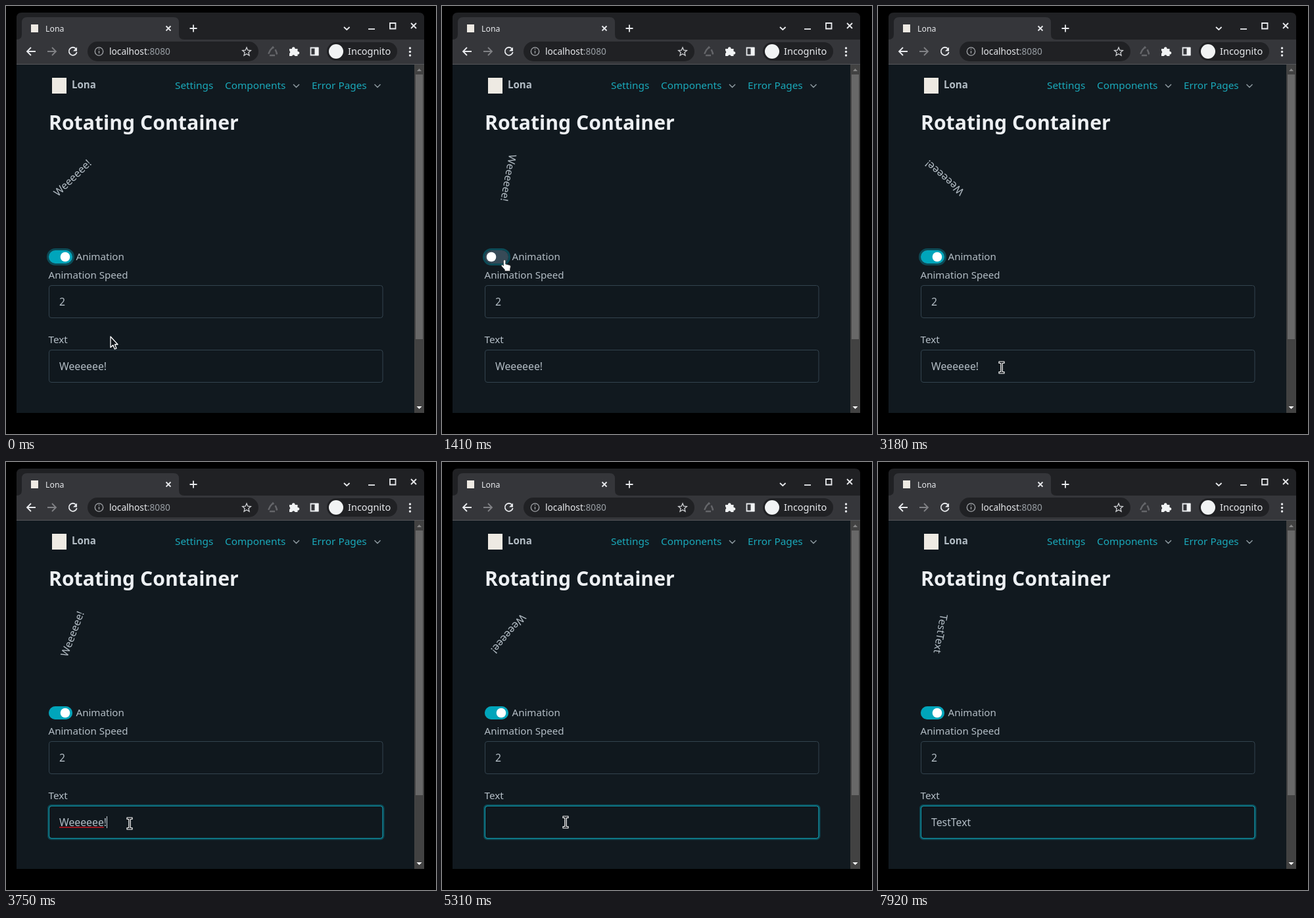
An HTML page for the animation above (8000 ms loop, 654x650 px).

```html
<!DOCTYPE html>
<html lang="en">
<head>
<meta charset="utf-8">
<title>Rotating Container</title>
<style>
  html, body { margin: 0; width: 100%; height: 100%; overflow: hidden; background: #000; }
  svg { display: block; width: 654px; height: 650px; }
  text { font-family: "Noto Sans", "Open Sans", sans-serif; font-size: 15.3px; fill: #b3bdc5; white-space: pre; }
  .input { font-size: 15.8px; }
  .link { fill: #1aa9ba; }
  .chrome { fill: #e8eaed; }
  .line { fill: none; stroke: #e8eaed; stroke-width: 1.8; }
  .field { fill: #10181e; stroke: #33434e; }
  .cursor { stroke: #fff; stroke-width: 1.3; stroke-linejoin: round; }
</style>
</head>
<body>
<svg viewBox="0 0 654 650">
  <!-- window frame and tab strip -->
  <path d="M16 89V18q0-8 8-8H628q8 0 8 8V89z" fill="#202124"/>
  <path d="M16 51q8 0 8-8V25q0-8 8-8H255q8 0 8 8V43q0 8 8 8H636V89H16z" fill="#35363a"/>
  <rect x="16" y="88" width="620" height="1" fill="#56575b"/>
  <rect x="38" y="28" width="11" height="12" fill="#eeeae3"/>
  <text class="chrome" x="60" y="39" style="font-size:12.3px">Lona</text>
  <g class="line">
    <path d="M243.5 30.5l7 7m0-7l-7 7"/>
    <path d="M285 28.5v11m-5.500-5.500h11"/>
    <path d="M514 32l4.300 4 4.300-4"/>
    <path d="M551 35h10"/>
    <path d="M584 26h8.500v8.500h-8.500z"/>
    <path d="M616 26l8 8m0-8l-8 8"/>
  </g>

  <!-- toolbar -->
  <rect x="124" y="54" width="260" height="30" rx="15" fill="#202124"/>
  <rect x="488" y="55" width="107" height="28" rx="14" fill="#202124"/>
  <path id="arrow" class="line" d="M45 69H32m6-6l-6 6 6 6"/>
  <path class="line" style="stroke:#808185" d="M63 69h13m-6-6l6 6-6 6"/>
  <path class="line" d="M106.500 65a6 6 0 1 0 1.200 5"/>
  <path d="M108 62.500v6h-6z" fill="#e8eaed"/>
  <g class="line" style="stroke:#a3a6aa;stroke-width:1.3">
    <circle cx="141.500" cy="69" r="6.200"/>
    <path d="M141.500 68v4m0-7.200v1.500"/>
  </g>
  <text x="157" y="74" style="font-size:13.7px;fill:#9aa0a6"><tspan fill="#e8eaed">localhost</tspan>:8080</text>
  <path class="line" style="stroke:#d0d2d5;stroke-width:1.3" d="M366 63l1.800 4.200 4.600.4-3.500 3 1.100 4.500-4-2.400-4 2.400 1.100-4.500-3.500-3 4.600-.4z"/>
  <path class="line" style="stroke:#65666a;stroke-width:2.4;stroke-dasharray:8 3" d="M402 67l4-4.500 4 4.500 2 5-2 3h-8l-3-2z"/>
  <path d="M431 65h4a2.300 2.300 0 1 1 4.500 0h4v4a2.300 2.300 0 1 1 0 4.500v2.500h-4a2.300 2.300 0 0 0-4.500 0h-4v-4a2.300 2.300 0 0 0 0-4z" fill="#f1f3f4"/>
  <path class="line" d="M463.500 63.500h11v11h-11z"/>
  <path d="M469.500 63h6v12h-6z" fill="#f1f3f4"/>
  <circle cx="502" cy="69" r="11" fill="#f1f3f4"/>
  <text class="chrome" x="520" y="74" style="font-size:14.5px">Incognito</text>
  <g fill="#e8eaed"><circle cx="614.500" cy="64" r="1.700"/><circle cx="614.500" cy="69.500" r="1.700"/><circle cx="614.500" cy="75" r="1.700"/></g>

  <!-- page -->
  <rect x="16" y="89" width="605" height="529" fill="#11191f"/>
  <rect x="621" y="89" width="15" height="529" fill="#424242"/>
  <rect x="623" y="104" width="11" height="402" fill="#686868"/>
  <path d="M625 99l3.500-4 3.500 4z" fill="#868686"/>
  <path d="M624.500 608l4 4 4-4z" fill="#fff"/>

  <rect x="70" y="109" width="22" height="24" fill="#eeeae3"/>
  <text x="100" y="125" style="font-size:15.1px;font-weight:700">Lona</text>
  <text class="link" x="257" y="126">Settings</text>
  <text class="link" x="333" y="126">Components</text>
  <text class="link" x="465" y="126">Error Pages</text>
  <path class="line" style="stroke:#8c989f;stroke-width:1.5" d="M437 119l4.500 4.500 4.500-4.500m114.500 0l4.500 4.500 4.500-4.500"/>
  <text x="65" y="188" style="font-size:30.2px;font-weight:700;fill:#edf0f3">Rotating Container</text>

  <text id="spinner" class="input"></text>

  <rect id="switchGlow" x="63.500" y="369.500" width="39" height="23" rx="11.500" fill="none" stroke="#0c4a56" stroke-width="3"/>
  <rect x="65" y="371" width="36" height="20" rx="10" fill="#374956"/>
  <rect id="switchOn" x="65" y="371" width="36" height="20" rx="10" fill="#00a5bb"/>
  <circle id="knob" cy="381" r="7.300" fill="#fff"/>
  <text x="106.500" y="386" style="font-size:15.1px">Animation</text>
  <text x="64.500" y="414" style="font-size:15.1px">Animation Speed</text>
  <rect class="field" x="65.500" y="424.500" width="507.500" height="49" rx="3.500"/>
  <text class="input" x="81" y="455">2</text>
  <text x="64.500" y="512">Text</text>
  <rect class="field" x="65.500" y="522.500" width="507.500" height="49" rx="3.500"/>
  <g id="fieldFocus" fill="none">
    <rect x="64.500" y="521.500" width="509.500" height="51" rx="4.500" stroke="#0c4a56" stroke-width="3"/>
    <rect x="65.500" y="522.500" width="507.500" height="49" rx="3.500" stroke="#0f9db0"/>
  </g>
  <text id="value" class="input" x="81" y="553"></text>
  <rect id="underline" x="81" y="554" height="1.500" fill="#c8141e"/>
  <rect id="caret" y="538" width="1" height="18" fill="#c5ced5"/>

  <!-- pointers, hot spot at the origin -->
  <g id="pointer">
    <path id="default" class="cursor" fill="#11151a" d="M0 0V16.500L3.800 13 6.300 19 9 17.900 6.500 12H11z"/>
    <path id="hand" fill="#fff" stroke="#222" stroke-width=".6" d="M-1.500 1.500q0-2 1.600-2t1.600 2V6l6 1.500q2 .5 1.700 2.500L8.500 13.500V16.500H.5V14.500L-4.500 9q-.8-2 1-2l2 1.500z"/>
    <path id="beam" class="cursor" fill="#11151a" style="stroke-width:1.2" d="M-4-9H4V-6.500H1.200V6.500H4V9H-4V6.500H-1.200V-6.500H-4z"/>
  </g>
</svg>
<script>
const LOOP = 8000, STEP = 79, ANCHOR = 2230;
const SPIN = 0.1264, START_ANGLE = 316, STOP = 1143, RESUME = 2225;
const FOCUS = 3500, ERASE = 4750, BLINK = 710, FADE = 260;
const INITIAL = 'Weeeeee!', TYPED = 'TestText';
const KEY_TIMES = [5780, 5935, 6090, 6170, 6730, 6810, 6960, 7040];
const PATH = [[100, 159, 502], [850, 95, 386], [2430, 95, 386], [2960, 188, 552],
              [3080, 188, 549], [3960, 188, 549], [4040, 188, 547]];

const el = id => document.getElementById(id);
const set = (id, attrs) => { for (const k in attrs) el(id).setAttribute(k, attrs[k]); };
const clamp = (v, lo = 0, hi = 1) => Math.min(hi, Math.max(lo, v));
const ease = p => p * p * (3 - 2 * p);
const fade = (t, start) => ease(clamp((t - start) / FADE));

const snap = t => Math.max(0, ANCHOR + STEP * Math.floor((t - ANCHOR) / STEP + 0.15));

function angleAt(t) {
  return START_ANGLE + SPIN * (Math.min(t, STOP) + Math.max(0, t - RESUME));
}

function spinnerText(t) {
  if (t < 5610) return INITIAL;
  if (t < 6490) return '';
  return t < 7365 ? 'Test' : TYPED;
}

function fieldState(t) {
  const erased = clamp(Math.floor((t - ERASE) / STEP) + 1, 0, INITIAL.length);
  const keys = KEY_TIMES.filter(k => k <= t).length;
  const text = keys ? TYPED.slice(0, keys) : INITIAL.slice(0, INITIAL.length - erased);
  const lastEdit = keys ? KEY_TIMES[keys - 1] : erased ? ERASE + (erased - 1) * STEP : FOCUS;
  return { text, lastEdit, typing: keys > 0 };
}

function pointerAt(t) {
  const next = PATH.findIndex(p => p[0] > t);
  if (next < 0) return PATH[PATH.length - 1].slice(1);
  if (next === 0) return PATH[0].slice(1);
  const [t0, x0, y0] = PATH[next - 1], [t1, x1, y1] = PATH[next];
  const p = ease((t - t0) / (t1 - t0));
  return [x0 + (x1 - x0) * p, y0 + (y1 - y0) * p];
}

function pointerKind(x, y) {
  if ((y > 424 && y < 474) || y > 522) return 'beam';
  return y > 370 && y < 393 && x < 182 ? 'hand' : 'default';
}

function drawSpinner(t) {
  const text = el('spinner');
  text.textContent = spinnerText(t);
  const half = text.getComputedTextLength() / 2;
  set('spinner', { x: -half, y: 5.5, transform: `translate(${65 + half} 261) rotate(${angleAt(t)})` });
}

function drawSwitch(t) {
  const on = 1 - fade(t, 1110) + fade(t, 2200);
  set('switchOn', { opacity: on });
  set('knob', { cx: 75 + 15 * on });
  set('switchGlow', { opacity: 1 - fade(t, FOCUS) });
}

function drawField(t) {
  const { text, lastEdit, typing } = fieldState(t);
  const value = el('value');
  value.textContent = text;
  const caretOn = t >= FOCUS && text && (t - lastEdit) % (2 * BLINK) < BLINK;
  set('caret', { x: Math.round(81 + value.getComputedTextLength()), opacity: caretOn ? 1 : 0 });
  const word = text.replace('!', '').length;
  const width = !typing && t >= FOCUS && word ? value.getSubStringLength(0, word) : 0;
  set('underline', { width });
  set('fieldFocus', { opacity: fade(t, FOCUS) });
}

function drawPointer(t) {
  const [x, y] = pointerAt(t), kind = pointerKind(x, y);
  set('pointer', { transform: `translate(${x} ${y})`, opacity: t < KEY_TIMES[0] ? 1 : 0 });
  for (const id of ['default', 'hand', 'beam']) set(id, { opacity: id === kind ? 1 : 0 });
}

function frame() {
  const t = snap(performance.now() % LOOP);
  drawSpinner(t);
  drawSwitch(t);
  drawField(t);
  drawPointer(t);
  requestAnimationFrame(frame);
}
frame();
</script>
</body>
</html>
```
